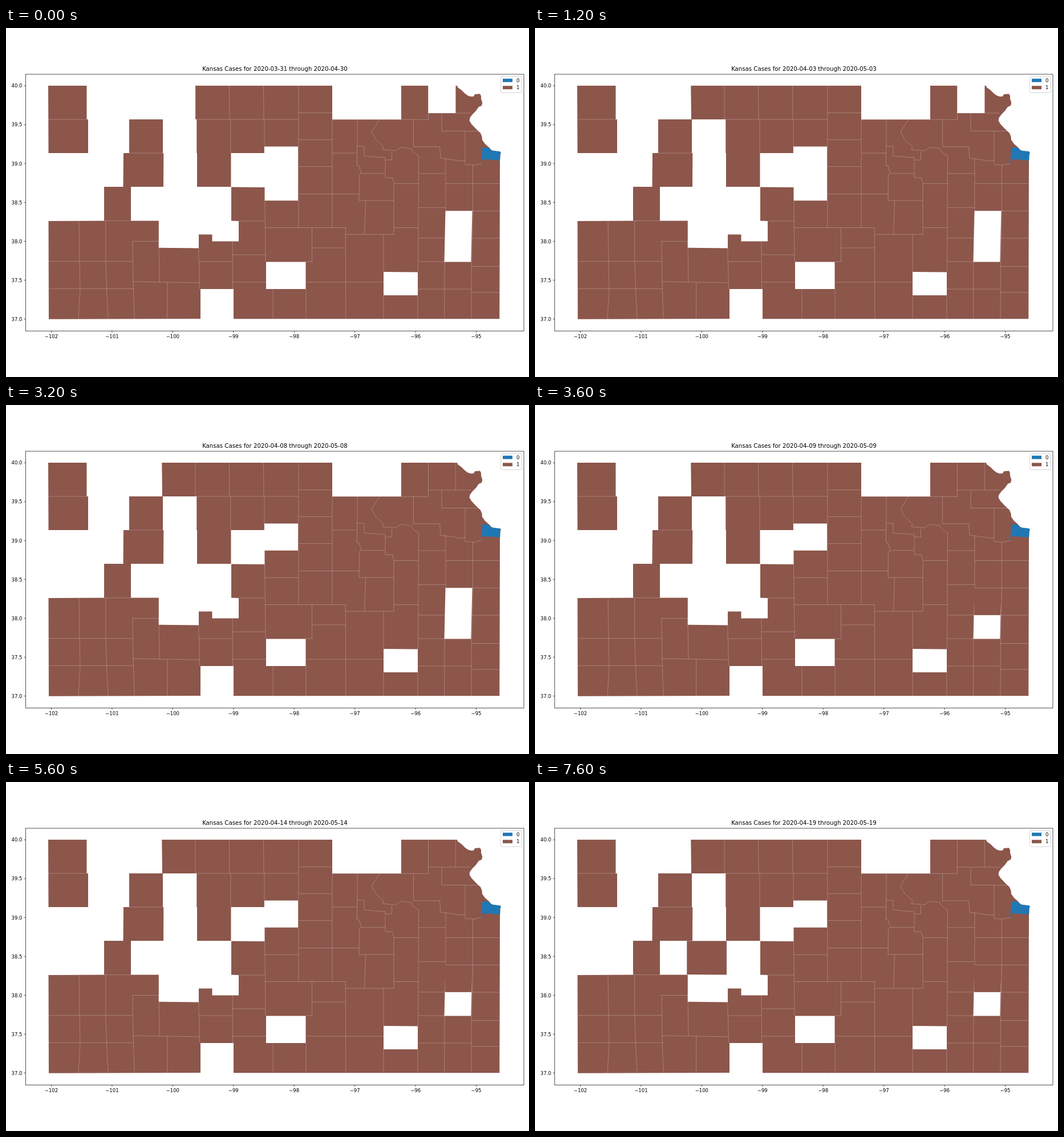
Write an HTML page that moves like this. It is 917 px wide and 611 px high and loops after 8 s.

```html
<!DOCTYPE html>
<html lang="en">
<head>
<meta charset="utf-8">
<title>Kansas Cases</title>
<style>
html, body { margin: 0; width: 100%; height: 100%; overflow: hidden; background: #fff; }
svg { display: block; width: 100vw; height: 100vh; }
text { font: 8.49px "DejaVu Sans", sans-serif; }
#title { font-size: 10.19px; }
.land { fill: #8c564b; }
.hole { fill: #fff; }
.zero { fill: #1f77b4; }
.seams { fill: none; stroke: #fff; stroke-opacity: .3; stroke-width: .8; }
.axes { fill: none; stroke: #000; stroke-width: .68; }
</style>
</head>
<body>
<svg viewBox="0 0 917 611">
  <!-- western and eastern land -->
  <g class="land">
    <path d="M74 101H141.5V160H144V219H74.5Z
      M216 160H275V219H276.3L276 278H219V337.5H267.8V384.8L338 385.5V361.5H361.5V373.5H408V338L395 337.5V278.5L453.5 279
      V302H513V207.5H453V219H394.5V278H335V219H334.3V160H332V101H514V509.3H399V457H341V509L75 509.8L74.5 338L172 337.5V278H205.5L206 219H216Z"/>
    <path d="M512 101H572V160.3H693V101H740.3V149H788.3V101H791L792 104L799 109L805 115L810 118.5L815 120L820 119.8L822 116L831 115.3
      L833 119V124L835.3 131L834 136L829 138L824 145L818 151L813.5 157L812.5 162L816 168L824 176.5L832 184L834.5 190L835 196L840 203L847 209
      L851 214L867 217L866 232L865.3 509.3H512Z"/>
  </g>
  <path class="hole" d="M456 409.5H525.5V457H456Z M662 427L722 427.5V468H662Z M770.5 320.3H817.5L815.3 409.5H768.5Z"/>

  <!-- counties that join later -->
  <g class="land">
    <path data-at="400" d="M273.3 101H333V160H274Z"/>
    <path data-at="1600" d="M453.5 254.8H513.5V302.5H453.5Z"/>
    <path data-at="1600" d="M740 101H789V149.5H740Z"/>
    <path data-at="3600" d="M770 320H818L816.3 368H769.5Z"/>
    <path data-at="7200" d="M266.3 278.3H336V337.5L266.3 337Z"/>
  </g>

  <g class="seams">
    <path d="M74 160H142 M216 219H275 M172 337.5H219 M128 338L129 409L130 457L127 509 M174.8 338V409L176.5 457L179 509
      M75 408.7H222 M75 456.3H224 M222 373.5H268 M268 373L269 445 M222 373L223 445L225 509 M222 444L339 446 M283 445L282.5 509
      M338 385V409H397 M338.5 409L339.5 457 M397 373.5L397.5 457"/>
    <path d="M332 101V160H513 M391.5 101L392 160 M451.5 101L452 160 M394 160V219 M453 160V219 M408 338H454 M397 397H455
      M397 445H456 M454 302L455 409 M454 302.3H513 M454 349.5H595.5 M468 457V509 M526 409H537 M536.5 349.5V409 M537 385H595
      M526 457V509 M526 445H662 M512.8 101V349.5 M513 148.5H572 M513 195.5H572 M513 242.6H572 M513 290.5H619
      M572 160V349.5 M572 219H615.5 M595.3 349.5L595.8 509"/>
    <path d="M616 160V207H628V224L665 227V231H676.5V217 M655 160L641 182L648 195L662 208L660 213L683 215L692 209L710 211L714 218L723.5 224
      M615.5 207V241L619 241.5L623 254.7H665 M623 254.7L619.5 257L619 302H680 M665 231V262H677L680.5 272.5H723.5
      M630.5 302.5L628.5 361 M595.5 361.3H680V272.5 M680 349.5H723 M662 361V427 M662 468V509 M723.5 224L722.5 427 M722 468V509
      M723.5 254.8H771 M723 314.4H771 M723 367.8H770 M723 409H769 M722 457H816 M769 409L768.5 509"/>
    <path d="M693 160.3H714.5V208H760.5L762 228L785 231L796 233L805 232 M714 160.3H740.5V101 M740 149H815 M788.3 101V149
      M764 149V180.5H828 M805 180.5V239L820 240L834 237 M771 228.5V320.3H865 M771 272.5H866 M818.5 240V320L816.3 409L816 509
      M769.5 368H865 M816 417.5H865 M816 463H865"/>
  </g>
  <path class="zero" d="M835 209.5L845 209L850 212.5L853 215L866 216L868 218.5L866.3 222V231.7L839 229.8L835 231L834.5 237L833.7 237.5Z"/>

  <rect class="axes" x="34.5" y="81" width="873.5" height="449.5"/>
  <g id="ticks"></g>
  <text id="title" x="471.4" y="75.3" text-anchor="middle"></text>

  <rect x="867.6" y="85.4" width="36.2" height="27.8" rx="1.7" fill="#fff" stroke="#ccc" stroke-width=".85"/>
  <path class="zero" d="M871 88.7h17v5.95h-17z"/>
  <path class="land" d="M871 101.3h17v5.95h-17z"/>
  <text x="894.9" y="94.8">0</text>
  <text x="894.9" y="107.4">1</text>
</svg>
<script>
const STEP = 400, LOOP = 8000, DAY = 864e5;
const title = document.getElementById('title');
const late = [...document.querySelectorAll('[data-at]')];

let ticks = '';
for (let lon = -102; lon <= -95; lon++) {
  const x = 79.5 + (lon + 102) * 106.43;
  ticks += `<path class="axes" d="M${x} 530.5v3"/>
    <text x="${x}" y="543" text-anchor="middle">\u2212${-lon}</text>`;
}
for (let lat = 37; lat <= 40; lat += 0.5) {
  const y = 101.2 + (40 - lat) * 136.1;
  ticks += `<path class="axes" d="M34.5 ${y}h-3"/>
    <text x="28.5" y="${y + 3.2}" text-anchor="end">${lat.toFixed(1)}</text>`;
}
document.getElementById('ticks').innerHTML = ticks;

const date = (month, day, offset) =>
  new Date(Date.UTC(2020, month, day) + offset * DAY).toISOString().slice(0, 10);

function draw(now) {
  const t = now % LOOP, day = Math.floor(t / STEP);
  title.textContent = `Kansas Cases for ${date(2, 31, day)} through ${date(3, 30, day)}`;
  for (const county of late) {
    county.style.display = t >= +county.dataset.at ? '' : 'none';
  }
}

const start = performance.now();
function loop() {
  draw(performance.now() - start);
  requestAnimationFrame(loop);
}
loop();
</script>
</body>
</html>
```
